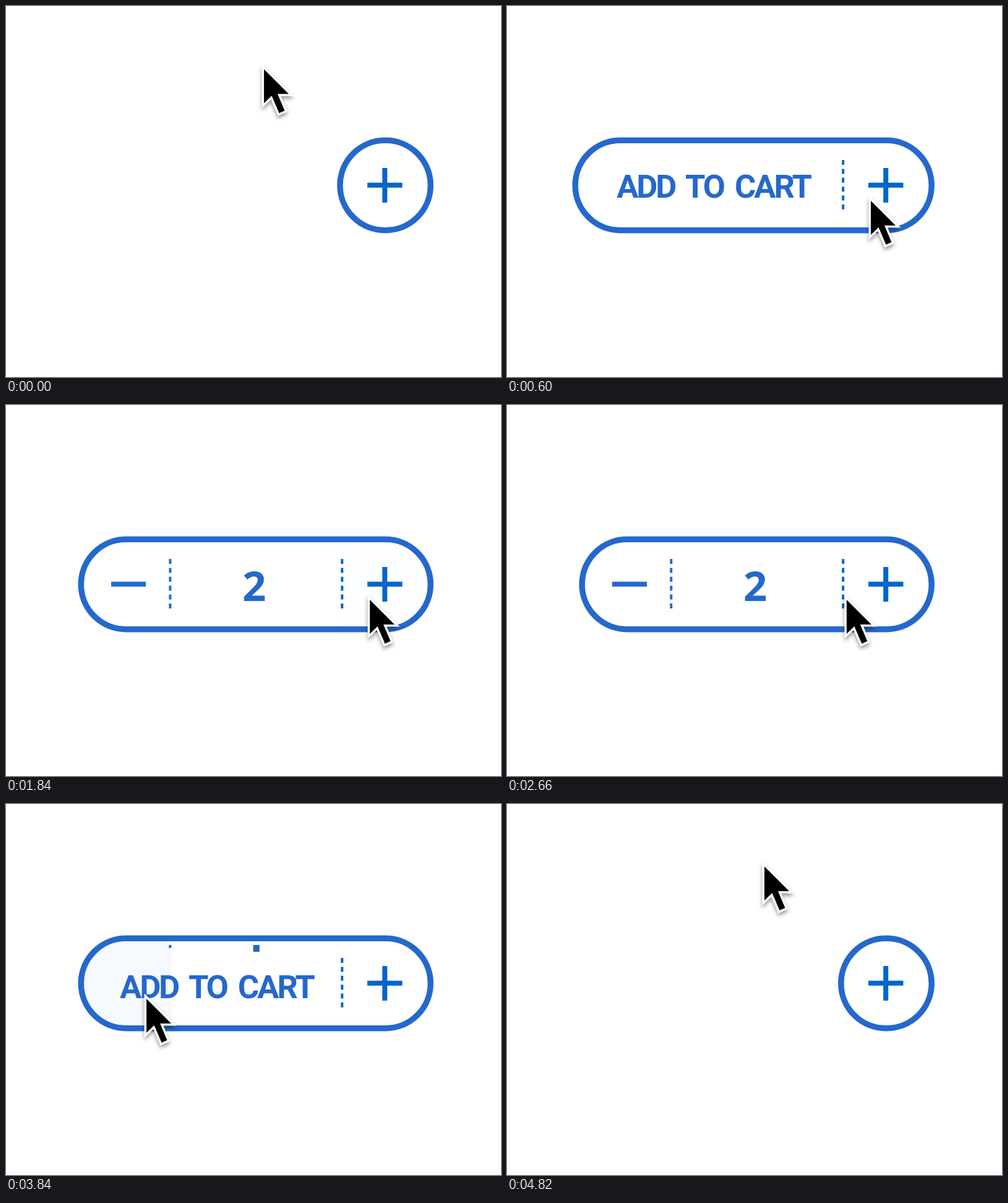
An HTML page for the animation above (5.46 s loop, 800x600 px).

```html
<!DOCTYPE html>
<html lang="en">
<head>
<meta charset="utf-8">
<title>Add to cart button</title>
<style>
  html, body { margin: 0; width: 100%; height: 100%; overflow: hidden; background: #fff; }
  svg { display: block; width: 800px; height: 600px; }
  text { fill: #2568cc; font-weight: 700; }
  .label { font-family: Roboto, sans-serif; font-size: 52.5px; letter-spacing: -3.2px; word-spacing: 8.5px; }
  .digit { font-family: "Open Sans", sans-serif; font-size: 67px; text-anchor: middle; }
  .dash { stroke-width: 4; stroke-dasharray: 8 6.4; }
  #cursor { filter: drop-shadow(0 4px 3px rgba(0, 0, 0, .4)); }
</style>
</head>
<body>
<svg viewBox="0 0 800 600">
  <defs>
    <clipPath id="inside"><rect class="pill" y="217.3" height="145.4" rx="72.7"/></clipPath>
    <clipPath id="window"><rect y="228" width="800" height="136"/></clipPath>
  </defs>
  <g clip-path="url(#inside)">
    <rect id="plusFlash" x="541" y="222" width="145" height="136" fill="#06c"/>
    <rect id="minusFlash" x="122" y="222" width="145.5" height="136" fill="#06c"/>
    <g clip-path="url(#window)">
      <text id="label" class="label" x="184" y="310">ADD TO CART</text>
      <g id="stepper" stroke="#2568cc">
        <path d="M170 289.8h56" stroke-width="8"/>
        <path class="dash" d="M265.3 249v80"/>
      </g>
      <text id="one" class="digit" x="401" y="317">1</text>
      <text id="two" class="digit" x="401" y="317">2</text>
    </g>
    <path id="divider" class="dash" d="M543.2 249v80" stroke="#06c"/>
  </g>
  <path d="M584 289.8h56.5M612.2 262v56" stroke="#06c" stroke-width="8"/>
  <rect class="pill" y="217.3" height="145.4" rx="72.7" fill="none" stroke="#2568cc" stroke-width="9.5"/>
  <g id="cursor">
    <path d="M0 0V55L12.5 43L24.5 71L33.5 67L22 40H40Z" stroke="#fff" stroke-width="7" paint-order="stroke"/>
  </g>
</svg>
<script>
const LOOP = 5460, SLIDE = 260, MOVE = 560;
const OPEN = 121.2, CLOSED = 539.8, RIGHT = 686.2;
const ADD = 1060, MORE = 1600, LESS = 3120, REMOVE = 3660;
const $ = id => document.getElementById(id);
const pills = document.querySelectorAll('.pill');

const progress = (t, start, length) => Math.min(1, Math.max(0, (t - start) / length));
const easeOut = p => 1 - (1 - p) ** 3;
const backOut = (p, s = 1.42) => 1 + (s + 1) * (p - 1) ** 3 + s * (p - 1) ** 2;
const mix = (a, b, p) => a + (b - a) * p;
const move = (t, start) => easeOut(progress(t, start, MOVE));

function place(id, x, y, visible = true) {
  $(id).setAttribute('transform', `translate(${x} ${y})`);
  $(id).setAttribute('visibility', visible ? 'visible' : 'hidden');
}

function flash(id, t, starts) {
  const start = starts.findLast(s => t > s);
  $(id).setAttribute('opacity', start ? .12 * (1 - progress(t, start, SLIDE)) : 0);
}

function cursorAt(t) {
  if (t < 2640) {
    const p = move(t, 0);
    return [mix(416, 588, p), mix(101, 315, p)];
  }
  if (t < 4105) return [mix(588, 227, move(t, 2640)), 315];
  const p = move(t, 4105);
  return [mix(227, 416, p), mix(315, 101, p)];
}

function draw(t) {
  const left = t < 4220
    ? mix(CLOSED, OPEN, backOut(progress(t, 130, MOVE)))
    : mix(OPEN, CLOSED, easeOut(progress(t, 4220, 420)));
  for (const pill of pills) {
    pill.setAttribute('x', left);
    pill.setAttribute('width', RIGHT - left);
  }
  place('divider', 0, 0, left < 535);

  const [add, more, less, remove] =
    [ADD, MORE, LESS, REMOVE].map(start => easeOut(progress(t, start, SLIDE)));
  const during = (from, to) => t > from && t < to + SLIDE;

  place('label', Math.min(0, .62 * (left - OPEN)),
    t < REMOVE ? 96 * add : 1.5 + 80 * (1 - remove), t < ADD + SLIDE || t > REMOVE);
  place('stepper', 0, t < REMOVE ? -99 * (1 - add) : -99 * remove, during(ADD, REMOVE));

  const oneY = t < MORE ? -78 * (1 - add)
    : t < LESS ? 96 * more
    : t < REMOVE ? -4 - 78 * (1 - less)
    : -4 - 76 * remove;
  place('one', 0, oneY, during(ADD, MORE) || during(LESS, REMOVE));
  place('two', 0, t < LESS ? -78 * (1 - more) : 96 * less, during(MORE, LESS));

  flash('plusFlash', t, [ADD, MORE]);
  flash('minusFlash', t, [2960, REMOVE]);
  place('cursor', ...cursorAt(t));
}

const begin = performance.now();
function tick() {
  draw((performance.now() - begin) % LOOP);
  requestAnimationFrame(tick);
}
tick();
</script>
</body>
</html>
```
